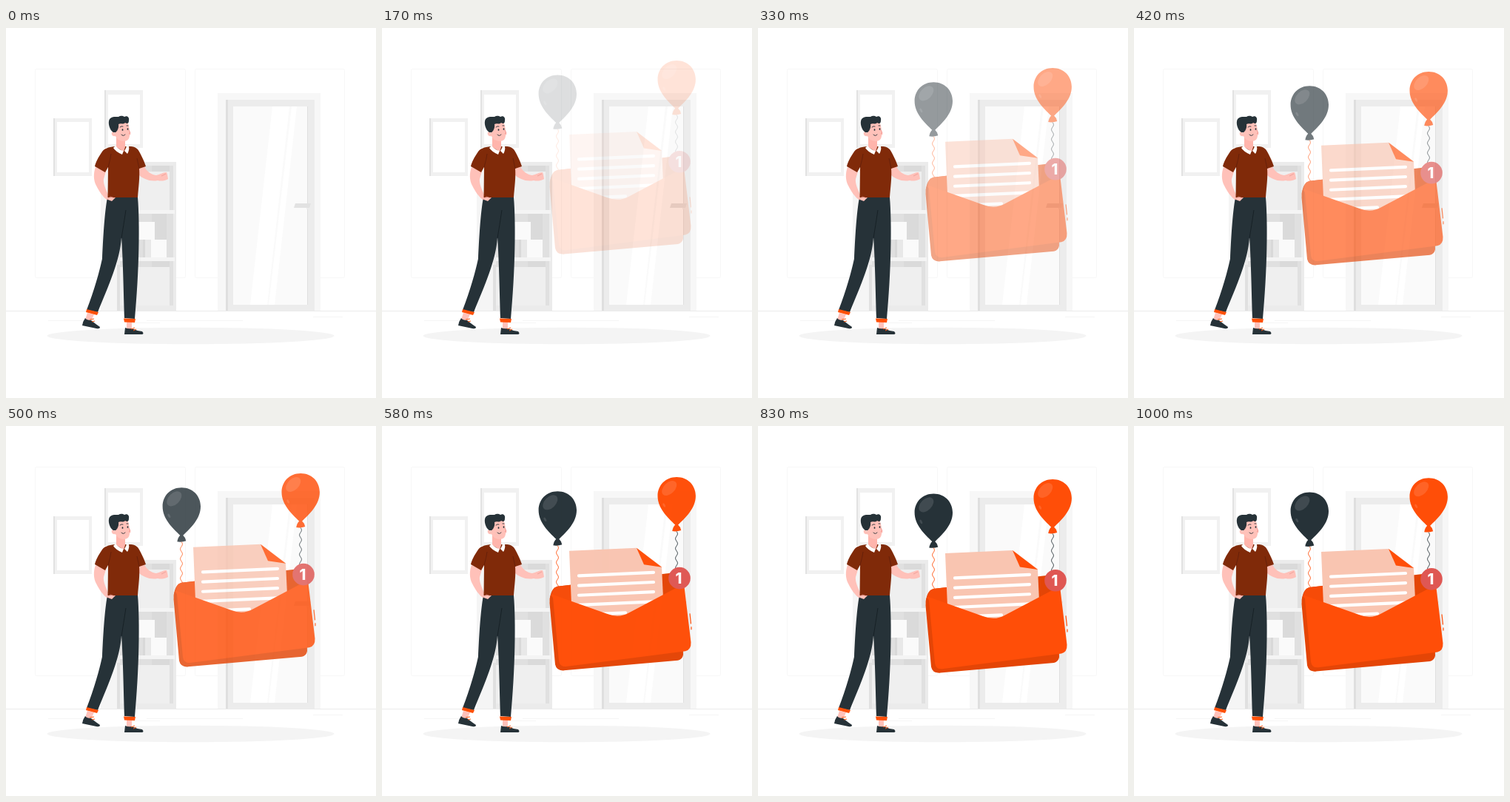
Animation, 500 px wide and 500 px high, one loop 1.04 s. Source, as an HTML page:

```html
<!DOCTYPE html>
<html lang="en">
<head>
<meta charset="utf-8">
<title>Message arriving</title>
<style>
html, body { margin: 0; width: 100%; height: 100%; overflow: hidden; background: #fff; }
svg { display: block; width: 100vw; height: 100vh; }
</style>
</head>
<body>
<svg viewBox="0 0 500 500">
  <defs>
    <g id="balloon">
      <path d="M0 0C15 0 25.7 11 25.7 25.5C25.7 42 13 54 1.5 65H-1.5C-13 54-25.7 42-25.7 25.5C-25.7 11-15 0 0 0Z"/>
      <path d="M-1.5 64H1.5Q5 67 6 72Q0 74-6 73Q-5 67-1.5 64Z"/>
      <ellipse cx="-10" cy="15" rx="12" ry="7.5" transform="rotate(-45 -10 15)" fill="#fff" opacity=".12"/>
      <ellipse cx="-17" cy="38" rx="1.5" ry="3" transform="rotate(-30 -17 38)" fill="#fff" opacity=".12"/>
    </g>
  </defs>

  <g id="room">
    <g fill="#fff" stroke="#f7f7f7">
      <rect x="39.5" y="55.5" width="203" height="282" rx="2"/>
      <rect x="255.5" y="55.5" width="202" height="282" rx="2"/>
    </g>
    <path d="M0 382.5H500" stroke="#ebebeb"/>
    <path d="M57 395.5H105M190 395.5H320M168 398.5H208M415 390.5H455" stroke="#f5f5f5"/>

    <path d="M64 122H116V200H64ZM133 84H185V162H133Z" fill="#f1f1f1"/>
    <path d="M64 122H66V200H64ZM133 84H135V162H133Z" fill="#e2e2e2"/>
    <path d="M69 127H112V195H69ZM138 90H181V157H138Z" fill="#fff"/>

    <path d="M128 181H150V382H128Z" fill="#f5f5f5"/>
    <path d="M150 181H230V382H150Z" fill="#ebebeb"/>
    <path d="M154 186H226V246H154ZM154 251H226V310H154ZM154 315H226V375H154ZM150 320H154V382H150Z" fill="#e0e0e0"/>
    <path d="M154 194H221V246H154ZM154 323H221V375H154Z" fill="#efefef"/>
    <path d="M197 186H221V194H197ZM197 251H217V310H197ZM197 315H221V323H197Z" fill="#dadada"/>
    <path d="M154 246H228V251H154ZM154 310H228V315H154Z" fill="#f4f4f4"/>
    <path d="M178 262H201V286H178ZM196 286H217V310H196Z" fill="#fafafa"/>
    <path d="M185 286H196V310H185Z" fill="#e8e8e8"/>
    <path d="M185 286H188V310H185Z" fill="#d8d8d8"/>

    <path d="M286 88H425V382H286Z" fill="#f7f7f7"/>
    <path d="M297 97H417V382H297Z" fill="#ececec"/>
    <path d="M297 97H300V382H297ZM406 106H408V374H406Z" fill="#dfdfdf"/>
    <path d="M307 106H407V374H307Z" fill="#fafafa"/>
    <path d="M360 106H383L353 374H330ZM386 106H393L363 374H355Z" fill="#fff"/>
    <path d="M407 237H412L410 245H406Z" fill="#ebebeb"/>
    <path d="M391 237H412L410 243H389Z" fill="#e2e2e2"/>
    <ellipse cx="249.5" cy="416" rx="194" ry="11.3" fill="#f4f4f4"/>
  </g>

  <g id="man">
    <g fill="#ffc1b9">
      <path d="M110 385L119 387L115 396L107 394ZM163 397H170V408H163Z"/>
      <path d="M179 190L187 187C190 194 196 198 203 199C208 198 212 195 217 195L218 198L219 204C214 207 209 207 205 206C195 208 185 204 179 198Z"/>
    </g>
    <path d="M107 392Q109 395 115 395Q121 400 127 404Q127 407 122 406L103 402Q104 396 107 392ZM161 405Q165 407 170 406Q176 409 184 410Q187 413 184 414H160Z" fill="#263238"/>
    <path d="M113 394L119 393M116 397L120 396M169 407L174 405M172 409L176 407" stroke="#ff5a14" fill="none"/>
    <path d="M137 229H178C181 262 180 330 174 393L160 392C159 360 158 310 156 283C154 314 139 347 124 384L109 381C119 355 126 330 130 312C131 288 133 250 137 229Z" fill="#263238"/>
    <path d="M162 246Q159 266 156 284" fill="none" stroke="#172126"/>
    <path d="M109 380L125 384L123 388L108 384ZM159 392.500L175 393L174 398L160 397.500Z" fill="#ff5008"/>
    <path d="M121 188C118 196 118 206 122 213C126 221 131 228 135 231L143 234L148 229L145 226L138 225C135 219 131 209 132 204L135 194Z" fill="#ffc1b9"/>
    <path d="M147 160C138 161 133 163 130 167C125 174 121 182 120 187L134 195L138 188L137.500 229H178C179 215 181 202 180 190L189 187C187 180 181 168 178 164C174 160 170 160 166 160Z" fill="#802a09"/>
    <path d="M138 188Q141 178 142 170M180 190L177 176" fill="none" stroke="#67200a"/>
    <path d="M149 147H161V161L159 167L149 161Z" fill="#ffb5ac"/>
    <path d="M148 159Q153 165 159 166L157 171Q148 167 145 162ZM160 166Q163 162 163 158L166 160Q167 165 164 170Z" fill="#fff"/>
    <path d="M147 142C148 137 150 131 153 128L164 127C166 131 167 137 167 140Q170 143 167 145C167 150 164 153 159 153C153 153 149 149 148 146C144 147 142 144 143 141Q145 139 147 142Z" fill="#ffc1b9"/>
    <path d="M145 141C140 138 137 128 140 123C143 119 149 120 152 120C155 118 158 119 160 120C164 118 167 121 166 125C166 129 164 130 161 128C158 131 155 128 152 130C153 135 150 140 148 141Z" fill="#263238"/>
    <g fill="none" stroke="#263238" stroke-width=".9" stroke-linecap="round">
      <path d="M154 134Q156 132 158 133M163 132L165 132M156 144Q158 147 161 144"/>
      <path d="M157.500 137V138M164.500 136V137" stroke-width="1.700"/>
    </g>
    <path d="M166 138Q169 142 166 143" fill="none" stroke="#ed847e" stroke-width=".8"/>
    <path d="M136 232L141 228L147 230M210 200L216 197" fill="none" stroke="#ed9a92" stroke-width=".8"/>
  </g>

  <g id="message">
    <path id="orangeString" fill="none" stroke="#ff4e08"/>
    <path id="darkString" fill="none" stroke="#263238"/>
    <use href="#balloon" x="237.300" y="90" fill="#263238"/>
    <use href="#balloon" x="398.200" y="70.700" fill="#ff4e08"/>
    <path d="M237 218.500L394 200Q403 199 405 206L407 311Q406 317 400 318.500L246 332Q236 333 234 324L226.500 241Q227 221 237 218.500Z" fill="#e44506"/>
    <path d="M237 218.500L260 216V240L229 232Q230 220 237 218.500Z" fill="#f64b08"/>
    <path d="M253 170.500L344 166.500L378 192L380 235L320 270L256 242Z" fill="#f9c5b1"/>
    <path d="M344 166.500L378 192.500L354 189Z" fill="#ff4e08"/>
    <path id="lines" stroke="#fff" stroke-width="4.200" stroke-linecap="round"/>
    <path d="M229 229L304 255.500Q320 262 334 254L408 215L417.500 294Q418 304 410 306L247 327Q239 327 237 319L227 237Q227 232 229 229Z" fill="#ff4e08"/>
    <path d="M228 230Q226 234 227 239L235 324Q237 332 246 332L248 327Q240 327 239 319L231 234Z" fill="#e44506"/>
    <path d="M416 255L417.500 269M418 273V277" stroke="#ff4e08" stroke-width="1.200"/>
    <circle cx="402" cy="207.300" r="14.800" fill="#df5753"/>
    <text x="401" y="214.500" text-anchor="middle" font-family="Inter, sans-serif" font-weight="800" font-size="20" fill="#fff">1</text>
  </g>
</svg>
<script>
const LOOP = 1040, FRAME = LOOP / 25;
const byId = id => document.getElementById(id);
const message = byId("message");

function wave(x, top, bottom) {
  let d = `M${x} ${top}`;
  for (let y = top + 1; y <= bottom; y++) {
    d += `L${(x + 1.4 * Math.sin((y - top) / 2.1)).toFixed(2)} ${y}`;
  }
  return d;
}

byId("orangeString").setAttribute("d", wave(237, 163, 220));
byId("darkString").setAttribute("d", wave(398, 144, 194));

byId("lines").setAttribute("d", [0, 1, 2, 3, 4].map(i => {
  const y = 204 + i * 13.2, width = i < 4 ? 101 : 63;
  return `M266 ${y}L${266 + width} ${y - width * 0.045}`;
}).join(""));

// Drops in while fading up, then dips once.
function draw(time) {
  const t = Math.floor((time % LOOP) / FRAME + 0.1) * FRAME;
  const enter = Math.min(1, Math.max(0, (t - 90) / 500));
  const dip = t > 590 ? 2.6 * Math.sin(Math.PI * (t - 590) / 450) : 0;
  message.setAttribute("opacity", enter);
  message.setAttribute("transform", `translate(0 ${-1.2 - 30 * (1 - enter) + dip})`);
}

const start = performance.now();
function tick() {
  draw(performance.now() - start);
  requestAnimationFrame(tick);
}
tick();
</script>
</body>
</html>
```
